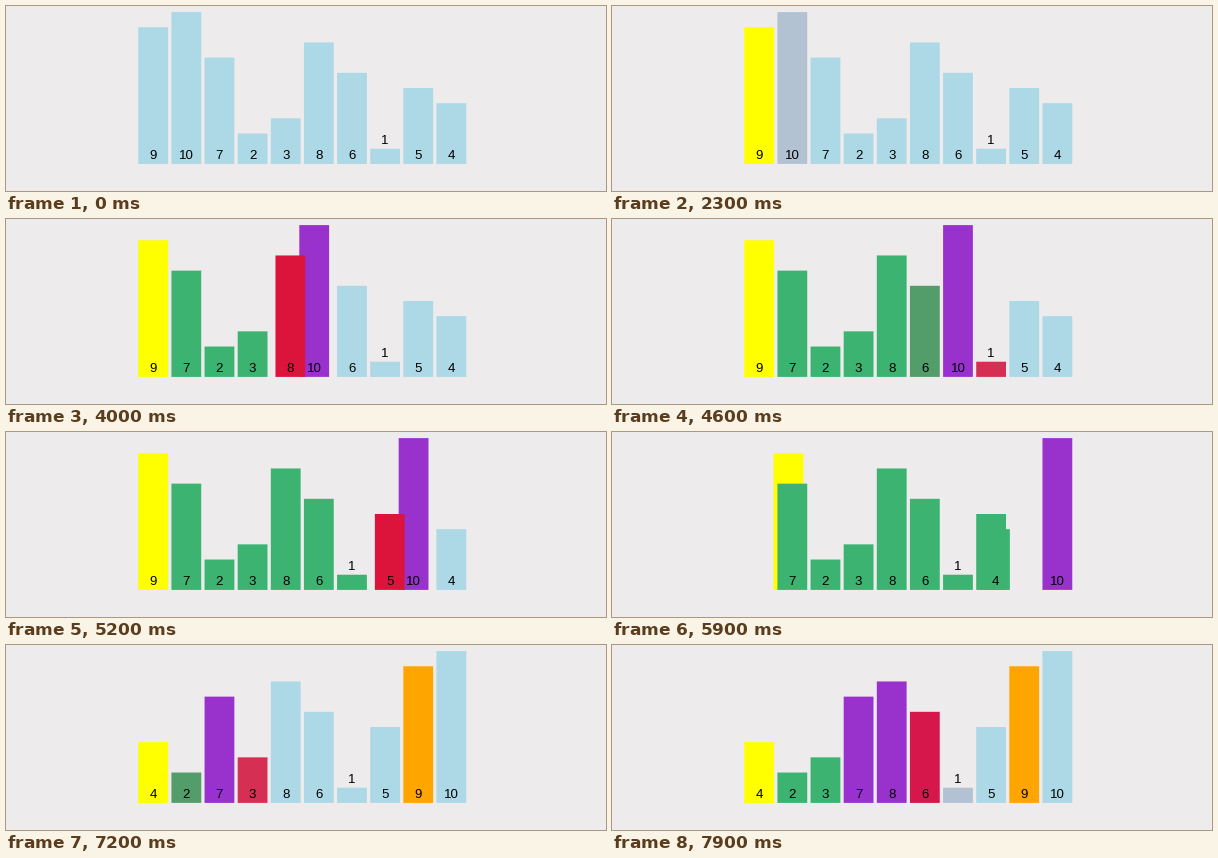
A matplotlib script that plays this animation: 600 px wide and 185 px high, repeating every 8000 ms.

```python
import numpy as np
import matplotlib.pyplot as plt
from matplotlib.animation import FuncAnimation
from matplotlib.colors import to_rgb
from matplotlib.patches import Rectangle

WIDTH, HEIGHT, DPI = 600, 185, 100
FRAMES, INTERVAL = 80, 100
STEP = 200                      # ms per algorithm state
LEFT, PITCH, BAR_WIDTH = 132.3, 33.13, 29.8
BASE, UNIT = 157.9, 15.18
BACKGROUND = "#edebec"
IDLE, PIVOT, CURRENT = "#add8e6", "#ffff00", "#dc143c"
SMALLER, LARGER, SORTED = "#3cb371", "#9932cc", "#ffa500"
VALUES = [9, 10, 7, 2, 3, 8, 6, 1, 5, 4]


def ease(p):
    p = min(max(p, 0.0), 1.0)
    return 2 * p * p if p < 0.5 else 1 - 2 * (1 - p) ** 2


class Track:
    """A value that eases towards each new target in turn."""

    def __init__(self, initial):
        self.initial = np.array(initial, float)
        self.keys = []

    def to(self, start, target):
        self.keys.append((start, np.array(target, float)))

    def at(self, time):
        value = self.initial
        for start, target in self.keys:
            if time > start:
                value = value + (target - value) * ease((time - start) / STEP)
        return value


class Bar:
    def __init__(self, ax, slot, value):
        self.value = value
        self.slot = Track(slot)
        self.color = Track(to_rgb(IDLE))
        height = value * UNIT
        self.rect = Rectangle((0, BASE - height), BAR_WIDTH, height, linewidth=0,
                              snap=False, zorder=2 * slot)
        ax.add_patch(self.rect)
        baseline = 152.6 if value > 1 else 137.5
        self.label = ax.text(0, baseline, str(value), ha="center", va="baseline",
                             family="Liberation Sans", fontsize=13.3 * 72 / DPI,
                             color="black", zorder=2 * slot + 1)

    def paint(self, time, color):
        self.color.to(time, to_rgb(color))

    def draw(self, time):
        x = LEFT + PITCH * float(self.slot.at(time))
        self.rect.set_x(x)
        self.rect.set_facecolor(tuple(np.clip(self.color.at(time), 0, 1)))
        self.label.set_x(x + BAR_WIDTH / 2)


def swap(order, a, b, time):
    order[a], order[b] = order[b], order[a]
    for slot in (a, b):
        order[slot].slot.to(time, slot)


def partition(order, first, last, time):
    """Schedule one partition pass; return the pivot slot and the end time."""
    pivot, store = order[first], first
    for i in range(first + 1, last + 1):
        bar = order[i]
        bar.paint(time, CURRENT)
        time += STEP
        if bar.value < pivot.value:
            store += 1
            if store != i:
                swap(order, store, i, time)
                time += STEP
            bar.paint(time, SMALLER)
        else:
            bar.paint(time, LARGER)
    time += STEP
    swap(order, first, store, time)
    time += STEP
    for bar in order[first:last + 1]:
        bar.paint(time, SORTED if bar is pivot else IDLE)
    return store, time + STEP


fig = plt.figure(figsize=(WIDTH / DPI, HEIGHT / DPI), dpi=DPI, facecolor=BACKGROUND)
ax = fig.add_axes([0, 0, 1, 1])
ax.set_xlim(0, WIDTH)
ax.set_ylim(HEIGHT, 0)
ax.axis("off")

bars = [Bar(ax, slot, value) for slot, value in enumerate(VALUES)]
order = list(bars)
order[0].paint(1953, PIVOT)
split, clock = partition(order, 0, len(order) - 1, 2253)
order[0].paint(clock, PIVOT)
partition(order, 0, split - 1, clock + STEP)


def update(frame):
    for bar in bars:
        bar.draw(frame * INTERVAL)
    return [artist for bar in bars for artist in (bar.rect, bar.label)]


animation = FuncAnimation(fig, update, frames=FRAMES, interval=INTERVAL,
                          repeat=True, repeat_delay=0, blit=False)
plt.show()
```
